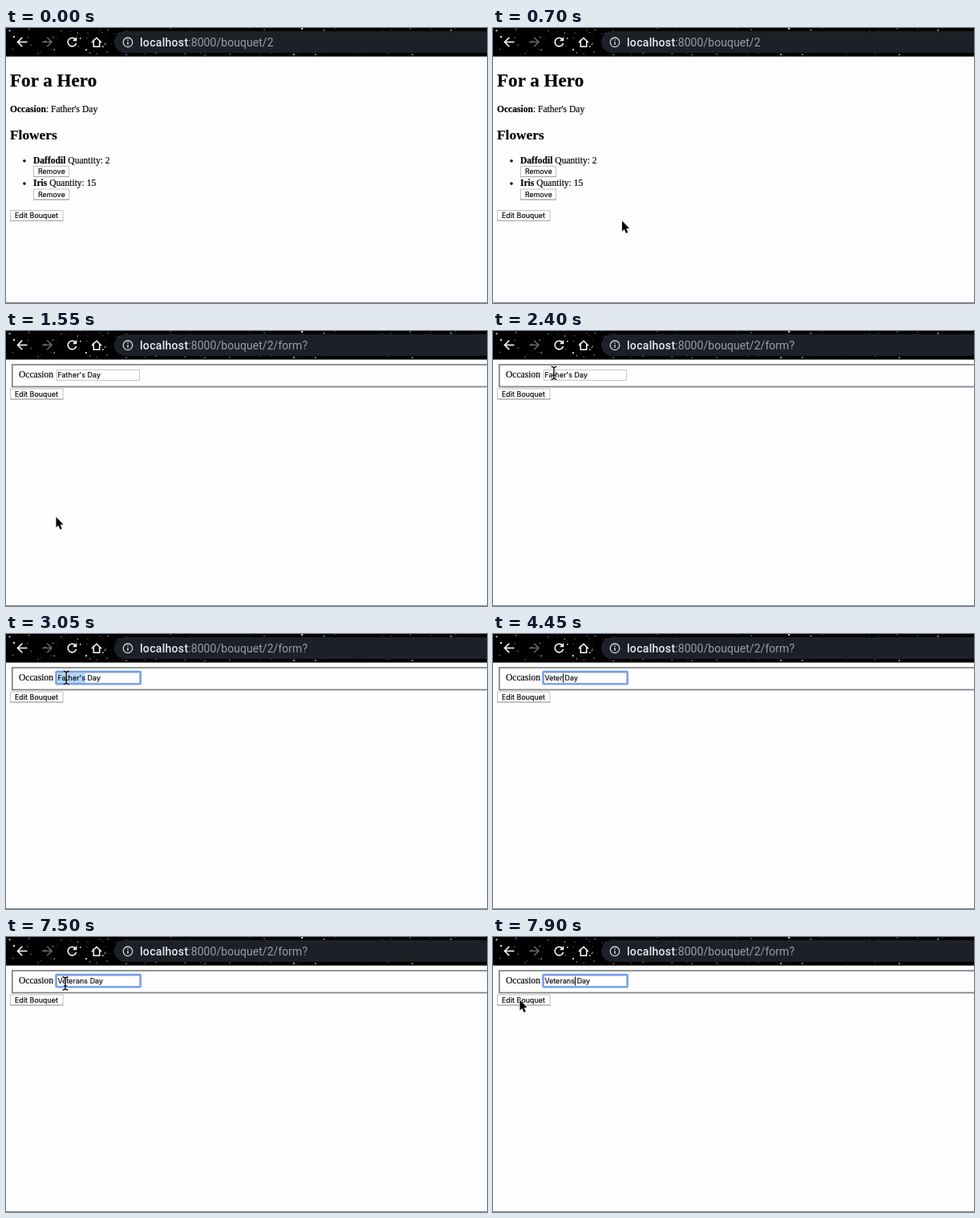
Recreate the animation shown at these times as an HTML page. Size 600 by 343 pixels, loop 8 s.

```html
<!DOCTYPE html>
<html lang="en">
<head>
<meta charset="utf-8">
<title>Bouquet</title>
<style>
  html, body { margin: 0; height: 100%; overflow: hidden; background: #fefdff; }
  svg { display: block; width: 600px; height: 343px; }
  text { white-space: pre; font: 11.55px "Liberation Serif", serif; stroke: #000; stroke-width: .18px; }
  .ui { font: 8.8px Inter, sans-serif; letter-spacing: .1px; }
  .url { font: 14.1px Roboto, sans-serif; fill: #999da3; stroke: none; }
  .host { font-weight: 500; letter-spacing: .25px; fill: #e8eaed; }
  .b { font-weight: 700; }
  .button rect { fill: #fff; stroke: #c2c2c2; }
  .button path { stroke: #a2a2a2; }
  .icon { fill: none; stroke: #fff; stroke-width: 1.6; }
</style>
</head>
<body>
<svg viewBox="0 0 600 343">
  <rect width="600" height="35.6" fill="#000"/>
  <g id="stars" fill="#fff"></g>
  <rect x="135" y="4" width="500" height="27" rx="13.5" fill="#1e2028"/>
  <g class="icon">
    <path d="M26.5 17.5H15M20.3 11.7L14.5 17.5L20.3 23.3"/>
    <path d="M45 17.5H56.5M51.2 11.7L57 17.5L51.2 23.3" stroke="#66686c"/>
    <path d="M86.5 14A5.3 5.3 0 1 0 87.6 19"/>
    <path d="M88.3 11V16.3H83Z" fill="#fff" stroke="none"/>
    <path d="M107 18.2L113 12.2L119 18.2M109.3 16.5V23.2H116.7V16.5" stroke-width="1.5"/>
    <circle cx="152" cy="17.8" r="5.8" stroke="#d5d7da" stroke-width="1.3"/>
    <path d="M152 17V21M152 14.3V15.7" stroke="#d5d7da" stroke-width="1.4"/>
  </g>
  <text class="url" x="167" y="22.5"><tspan class="host">localhost</tspan><tspan id="path"></tspan></text>

  <g id="detail">
    <text class="b" x="5" y="73" style="font-size:23.1px">For a Hero</text>
    <text x="5" y="104.8"><tspan class="b">Occasion</tspan>: Father's Day</text>
    <text class="b" x="5" y="138.5" style="font-size:17.33px">Flowers</text>
    <circle cx="23" cy="165.8" r="1.8"/>
    <text x="34" y="168.7"><tspan class="b">Daffodil</tspan> Quantity: 2</text>
    <circle cx="23" cy="194" r="1.8"/>
    <text x="34" y="197"><tspan class="b">Iris</tspan> Quantity: 15</text>
  </g>

  <g id="form">
    <rect x="7.8" y="42" width="620" height="27.5" fill="none" stroke="#808080" stroke-width="1.7"/>
    <text x="16" y="58.2">Occasion</text>
    <rect x="63.5" y="48.5" width="103" height="13" fill="#fff" stroke="#c6c6c6"/>
    <g id="ring" fill="none">
      <rect x="61.5" y="46" width="107.3" height="17.2" rx="1.5" stroke="#b9d0fb"/>
      <rect x="62.5" y="47" width="105.3" height="15.2" rx=".8" stroke="#6f9ff3" stroke-width="2"/>
    </g>
    <rect id="selection" x="64.5" y="49" height="12" fill="#b3d7ff"/>
    <text class="ui" id="value" x="64.5" y="58.2"></text>
    <rect id="caret" y="49.5" width="1" height="11"/>
  </g>

  <path d="M0 342.5H600" stroke="#8c8c8c"/>
  <path id="arrow" d="M0 0V13L2.9 10.4L5 15.4L7.3 14.4L5.2 9.5H9.1Z" stroke="#fff" stroke-width="1.2" paint-order="stroke"/>
  <g id="beam" fill="none">
    <path d="M-3.5 -8Q0 -8 0 -5.5Q0 -8 3.5 -8M0 -6V6M-3.5 8Q0 8 0 5.5Q0 8 3.5 8M-1.8 3H1.8" stroke="#fff" stroke-width="2.4" opacity=".7"/>
    <path d="M-3.5 -8Q0 -8 0 -5.5Q0 -8 3.5 -8M0 -6V6M-3.5 8Q0 8 0 5.5Q0 8 3.5 8M-1.8 3H1.8" stroke="#000" stroke-width="1.3"/>
  </g>
</svg>
<script>
const $ = id => document.getElementById(id);
const NS = "http://www.w3.org/2000/svg";

function add(parent, tag, attrs, text = "") {
  const el = parent.appendChild(document.createElementNS(NS, tag));
  for (const key in attrs) el.setAttribute(key, attrs[key]);
  el.textContent = text;
  return el;
}

function button(parent, x, y, w, label) {
  const g = add(parent, "g", { class: "button" });
  add(g, "rect", { x: x + .5, y: y + .5, width: w - 1, height: 13 });
  add(g, "path", { d: `M${x} ${y + 13.5}h${w}` });
  add(g, "text", { class: "ui", x: x + 5.9, y: y + 10.2 }, label);
}
button($("detail"), 34, 172, 45, "Remove");
button($("detail"), 34, 200.5, 45, "Remove");
button($("detail"), 5, 227, 66.5, "Edit Bouquet");
button($("form"), 5, 71.5, 66.5, "Edit Bouquet");

let seed = 11;
const random = () => (seed = seed * 16807 % 2147483647) / 2147483647;
for (let i = 0; i < 240; i++) {
  add($("stars"), "circle", {
    cx: random() * 600, cy: random() * 34,
    r: .4 + random() ** 3 * .9, opacity: .4 + random() * .6
  });
}

// [time, x, y] of the pointer
const approach = [[250, 398, 297], [400, 345, 282], [600, 210, 250], [800, 112, 231],
  [950, 80, 227.5], [1050, 73, 229], [1250, 66.8, 229.8], [1400, 66.8, 229.8],
  [1550, 62.5, 232], [1600, 62, 233], [1850, 61, 232], [2000, 62, 200],
  [2150, 80, 125], [2300, 84, 66], [2400, 76, 52.3], [2500, 75, 50.5],
  [2650, 75, 54], [2700, 75.2, 54.5]];
const leave = [[7500, 74, 58], [7650, 62, 67], [7800, 38, 76], [7900, 33.5, 78.5]];

function along(points, t) {
  const i = points.findIndex(p => p[0] > t);
  if (i < 0) return points.at(-1).slice(1);
  const [a, b] = [points[i - 1], points[i]];
  const k = (t - a[0]) / (b[0] - a[0]);
  return [a[1] + (b[1] - a[1]) * k, a[2] + (b[2] - a[2]) * k];
}

const keyTimes = [3850, 4100, 4250, 4350, 4450, 5100, 5550, 6550];
const blinks = [[4950, 5100], [6050, 6550], [7050, 7550]];
const show = (id, on) => $(id).style.display = on ? "" : "none";

function draw(t) {
  const onForm = t >= 1450;
  show("detail", !onForm);
  show("form", onForm);
  $("path").textContent = ":8000/bouquet/2" + (onForm ? "/form?" : "");

  if (onForm) {
    const count = keyTimes.filter(k => k <= t).length;
    const word = count ? "Veterans".slice(0, count) : "Father's";
    $("value").textContent = word + " Day";
    const width = $("value").getSubStringLength(0, word.length);
    show("ring", t >= 2900);
    show("selection", t >= 3050 && !count);
    $("selection").setAttribute("width", width);
    show("caret", count && !blinks.some(([a, b]) => t >= a && t < b));
    $("caret").setAttribute("x", Math.round(64.5 + width));
  }

  const visible = t >= 250 && t < 3850 || t >= 7500;
  const [x, y] = visible ? along(t < 3850 ? approach : leave, t) : [0, 0];
  const overInput = onForm && x > 63 && y > 48 && y < 62;
  show("arrow", visible && !overInput);
  show("beam", visible && overInput);
  for (const id of ["arrow", "beam"]) $(id).setAttribute("transform", `translate(${x} ${y})`);
}

function tick() {
  draw(Math.floor(performance.now() % 8000 / 50) * 50);
  requestAnimationFrame(tick);
}
tick();
</script>
</body>
</html>
```
